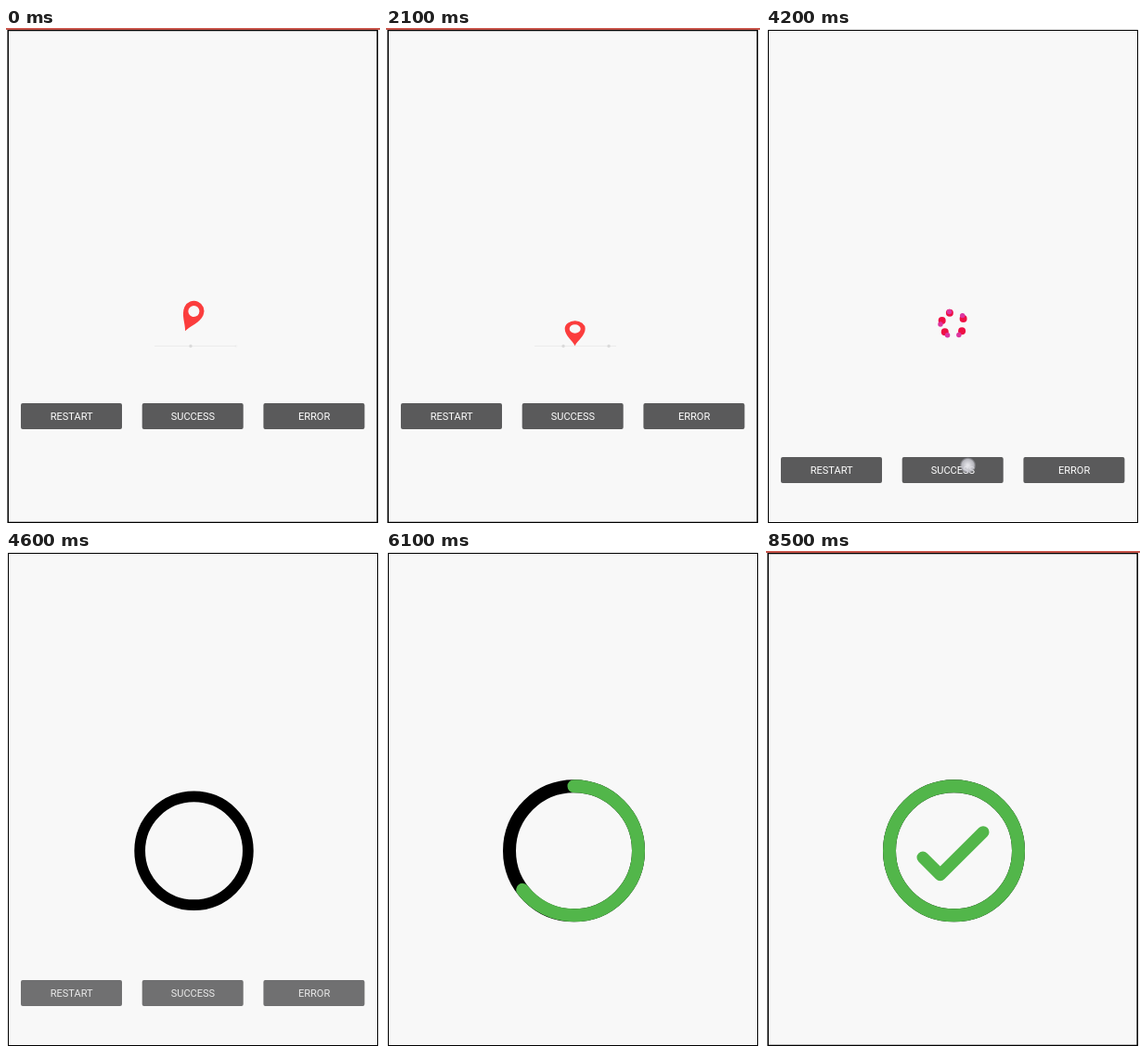
Recreate the animation shown at these times as an HTML page with a canvas. Size 403x533 px, loop 8.6 s.

```html
<!DOCTYPE html>
<html lang="en">
<head>
<meta charset="utf-8">
<title>Pin loader</title>
<style>
html, body { margin: 0; width: 100%; height: 100%; overflow: hidden; background: #fff; }
canvas { display: block; }
</style>
</head>
<body>
<canvas id="stage" width="403" height="533"></canvas>
<script>
const ctx = document.getElementById('stage').getContext('2d');
const LOOP = 8600, TAU = Math.PI * 2, RAD = Math.PI / 180;
const CX = 202.5, CY = 322.8, RING = 69.5;
const GREEN = '#52b64a';

const progress = (t, from, to) => Math.min(1, Math.max(0, (t - from) / (to - from)));
const easeOut = p => 1 - (1 - p) ** 3;

function dot(x, y, r, color) {
  ctx.fillStyle = color;
  ctx.beginPath();
  ctx.arc(x, y, r, 0, TAU);
  ctx.fill();
}

function line(points, width, color, cap = 'butt') {
  ctx.lineWidth = width;
  ctx.strokeStyle = color;
  ctx.lineCap = ctx.lineJoin = cap === 'round' ? 'round' : 'miter';
  if (cap === 'butt') ctx.lineCap = 'butt';
  ctx.beginPath();
  points.forEach(p => ctx.lineTo(...p));
  ctx.stroke();
}

function arc(turn, color, r = RING, width = 14) {
  ctx.lineWidth = width;
  ctx.strokeStyle = color;
  ctx.lineCap = 'round';
  ctx.beginPath();
  ctx.arc(CX, CY, r, -TAU / 4, -TAU / 4 + turn * TAU);
  ctx.stroke();
}

function drawWindow(striped) {
  ctx.fillStyle = '#fff';
  ctx.fillRect(0, 0, 403, 533);
  ctx.fillStyle = '#f8f8f8';
  ctx.fillRect(2, 2, 399, 531);
  ctx.lineJoin = 'miter';
  ctx.strokeStyle = '#000';
  ctx.lineWidth = striped ? 1.5 : 1;
  ctx.strokeRect(striped ? 2.2 : 2.5, 2.5, 398, 530);
  if (striped) {
    ctx.fillStyle = '#c8564c';
    ctx.fillRect(0, 0, 403, 2);
  }
}

function drawButtons(y, alpha) {
  ctx.globalAlpha = alpha;
  ctx.font = '11px Roboto, sans-serif';
  ctx.textAlign = 'center';
  ['RESTART', 'SUCCESS', 'ERROR'].forEach((label, i) => {
    const x = 16 + i * 130.7;
    ctx.fillStyle = '#5a5a5b';
    ctx.beginPath();
    ctx.roundRect(x, y, 109, 28, 2);
    ctx.fill();
    ctx.fillStyle = '#fff';
    ctx.fillText(label, x + 54.7, y + 18.3);
  });
  ctx.globalAlpha = 1;
}

function drawTrack(t) {
  line([[160, 342.5], [248, 342.5]], 1, '#ececec');
  for (let i = 0; i < 4; i++) {
    const x = 199 + i * 49 - t * 0.0271;
    ctx.globalAlpha = progress(x, 160, 168) * progress(x, 249, 241);
    dot(x, 342.5, 1.7, '#dadada');
  }
  ctx.globalAlpha = 1;
}

function drawPin(t) {
  const phase = (t / 840 + 0.5) % 1;
  const h = 1 - (2 * phase - 1) ** 2;
  const squash = 1 - 0.22 * Math.max(0, 1 - h * 4);
  ctx.save();
  ctx.translate(203.7 - 10.7 * h, 342.3 - 16 * h);
  ctx.rotate(23.8 * RAD * h);
  ctx.scale(1, squash);
  ctx.fillStyle = '#fb3d3d';
  ctx.beginPath();
  ctx.moveTo(0, 0);
  ctx.bezierCurveTo(-2.5, -7, -11, -14, -11, -23.5);
  ctx.arc(0, -23.5, 11, Math.PI, TAU);
  ctx.bezierCurveTo(11, -14, 2.5, -7, 0, 0);
  ctx.fill();
  dot(0, -23.3, 6, '#f8f8f8');
  ctx.restore();
}

function drawBurst(t, start, big, small) {
  const p = (t - start) / 400;
  if (p < 0 || p >= 1) return;
  const out = 1 - (1 - p) ** 2;
  const ring = (angles, r, size, color) => angles.forEach(a =>
    dot(201.5 + r * Math.cos(a * RAD), 318.5 + r * Math.sin(a * RAD), size * (1 - p), color));
  ring(big, 70 * out, 4.4, '#ee1045');
  ring(small, 4 + 54 * out, 3, '#dd35a0');
}

function drawCross(t) {
  const e = easeOut(progress(t, 2500, 3000));
  const half = 55.5 * easeOut(progress(t, 2350, 2590));
  const rest = (1 - e) / 0.512;
  const x = 198 - 6.5 * rest, y = 326 - 4.5 * rest;
  const bar = (from, to, bend) => {
    const a = from + (to - from) * e;
    const end = (deg, r) => [x + r * Math.cos(deg * RAD), y + r * Math.sin(deg * RAD)];
    line([end(a + bend, -half), [x, y], end(a - bend, half)], 17, 'rgba(200,35,38,.85)');
  };
  bar(-127.8, -45, 0);
  bar(-62.4, 45, 2.4 * rest);
}

function drawTouch(t) {
  const fade = 1 - progress(t, 4250, 4450);
  if (t < 4160 || !fade) return;
  ctx.globalAlpha = fade;
  const glow = ctx.createRadialGradient(217.5, 471, 1, 217.5, 471, 9);
  glow.addColorStop(0, 'rgba(235,235,240,.95)');
  glow.addColorStop(0.7, 'rgba(200,200,208,.85)');
  glow.addColorStop(1, 'rgba(160,160,170,0)');
  dot(217.5, 471, 9, glow);
  ctx.globalAlpha = 1;
}

function drawSuccess(t) {
  const grow = easeOut(progress(t, 4350, 4900));
  if (grow) arc(1, '#000', RING * grow, 14 * grow);
  const turn = 1 - (1 - progress(t, 5320, 7800)) ** 2.75;
  if (turn) arc(turn, GREEN);

  // The tick's long stroke is about 2.4 times the short one.
  const tick = progress(t, 7200, 7700);
  if (!tick) return;
  const a = Math.min(1, tick / 0.29), b = progress(tick, 0.29, 1);
  const points = [[169, 330], [169 + 18.7 * a, 330 + 18.7 * a]];
  if (b) points.push([187.7 + 46.3 * b, 348.7 - 46 * b]);
  line(points, 13, GREEN, 'round');
}

function draw(t) {
  const roaming = t < 2300;
  drawWindow(roaming || t >= 8500);
  if (t < 4900) drawButtons(roaming ? 404 : 462, 1 - progress(t, 4550, 4900));
  if (roaming) {
    drawTrack(t);
    drawPin(t);
  }
  drawBurst(t, 2265, [-112, -46, 35, 154], [-113, -48, 33]);
  if (t >= 2350 && t < 4160) drawCross(t);
  drawBurst(t, 4164, [-107, -26, 39, 135, 197], [-107, -41, 62, 116, 178]);
  drawTouch(t);
  drawSuccess(t);
}

const start = performance.now();
function frame() {
  draw((performance.now() - start) % LOOP);
  requestAnimationFrame(frame);
}
frame();
</script>
</body>
</html>
```
